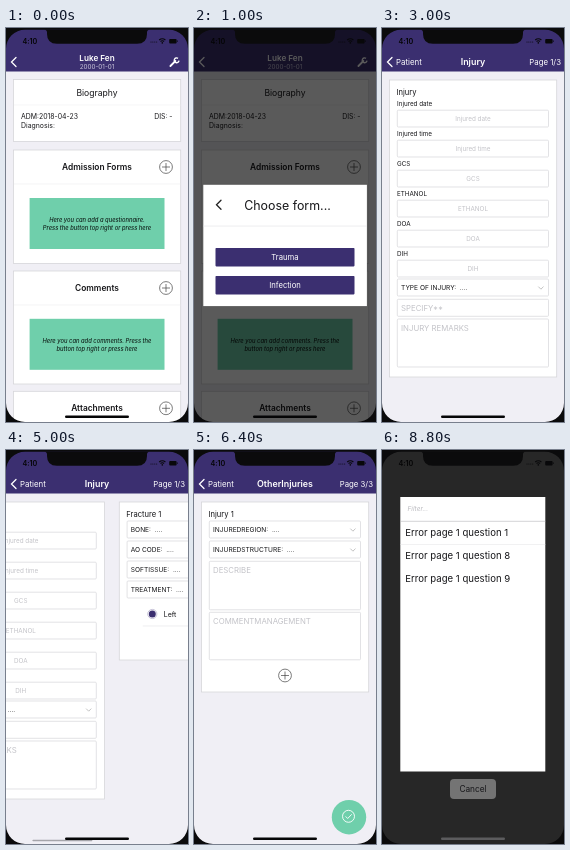
Animation, 182 px wide and 394 px high, one loop 8.9 s. Source, as an HTML page:

```html
<!DOCTYPE html>
<html lang="en">
<head>
<meta charset="utf-8">
<title>Patient forms</title>
<style>
  html, body { margin: 0; width: 100%; height: 100%; overflow: hidden; background: #0b0b0c; }
  svg { display: block; width: 100vw; height: 100vh; font-family: Inter, Roboto, sans-serif; }
</style>
</head>
<body>
<svg id="stage" viewBox="0 0 182 394"></svg>
<script>
const LOOP = 8900, W = 182, H = 394;
const PURPLE = '#3b2f70', GREEN = '#6fcfab', PAGE = '#f0eff5', EDGE = '#d6d6da', HINT = '#c3c3c8', INK = '#17171a';

// Drawing helpers
const rect = (x, y, w, h, fill, more = '') =>
  `<rect x="${x}" y="${y}" width="${w}" height="${h}" fill="${fill}" ${more}/>`;
const text = (s, x, y, size, fill = INK, more = '') =>
  `<text x="${x}" y="${y}" font-size="${size}" fill="${fill}" ${more}>${s}</text>`;
const stroke = (d, color, width, more = '') =>
  `<path d="${d}" fill="none" stroke="${color}" stroke-width="${width}" ${more}/>`;
const group = (id, body, more = '') => `<g id="${id}" ${more}>${body}</g>`;
const MID = ' text-anchor="middle"', END = ' text-anchor="end"', ITALIC = ' font-style="italic"';
const MEDIUM = ' font-weight="500"', BOLD = ' font-weight="600"';

const hline = (x1, x2, y, color = '#e2e2e6') => stroke(`M${x1} ${y}H${x2}`, color, .6);
const card = (y, h) => rect(7.5, y, 167.2, h, '#fff', `stroke="${EDGE}" stroke-width=".8"`);
const box = (y, h) => rect(15.3, y, 151.2, h, '#fff', `rx="1" stroke="${EDGE}" stroke-width=".7"`);
const plus = (x, y) => `<circle cx="${x}" cy="${y}" r="6.4" fill="none" stroke="#444" stroke-width=".7"/>` +
  stroke(`M${x - 4} ${y}h8M${x} ${y - 4}v8`, '#444', .7);
const back = (x, y, color) => stroke(`M${x + 4.5} ${y - 4.5}l-4.5 4.5 4.5 4.5`, color, 1.3, 'stroke-linecap="round"');
const field = (label, y) => text(label, 15, y, 6.3) + box(y + 4.2, 16.8) + text(label, 91, y + 15, 6.3, HINT, MID);
const picker = (label, y) => box(y, 17) + text(label + ':\u00a0 ....', 19, y + 10.8, 6.6) +
  stroke(`M156.3 ${y + 7.6}l2.6 2.6 2.6-2.6`, '#aaa', .7);
const area = (label, y, h) => box(y, h) + text(label, 19, y + 11.7, 7.8, HINT);
const radio = (x, y, on) => `<circle cx="${x}" cy="${y}" r="4.6" fill="#fff" stroke="#b9b4cf" stroke-width=".8"/>` +
  (on ? `<circle cx="${x}" cy="${y}" r="3.5" fill="${PURPLE}"/>` : '');

// Patient page
const section = (title, y, h) => card(y, h) + text(title, 91, y + 20, 8.4, INK, MID + BOLD) +
  plus(160, y + 17) + hline(8, 174.5, y + 34, '#ececef');
const hint = (y, a, b) => rect(23.6, y, 134.9, 51, GREEN) +
  text(a, 91, y + 24.3, 5.8, '#12241d', MID + ITALIC + MEDIUM) +
  text(b, 91, y + 31.7, 5.8, '#12241d', MID + ITALIC + MEDIUM);
const lowerCards = section('Comments', 243, 113) +
  hint(290.8, 'Here you can add comments. Press the', 'button top right or press here') +
  section('Attachments', 363.3, 113) +
  hint(410.8, 'Here you can add attachments.', 'Press the button top right or press here');

const patient = rect(0, 0, W, H, PAGE) + card(51.5, 62) +
  text('Biography', 91, 68, 8.6, INK, MID) + hline(8, 174.5, 77, '#f0f0f2') +
  text('ADM:2018-04-23', 15, 91.3, 6.9) + text('Diagnosis:', 15, 99.7, 6.9) + text('DIS: -', 166.5, 91.3, 6.9, INK, END) +
  group('noForm', section('Admission Forms', 122, 113.5) +
    hint(170, 'Here you can add a questionnaire.', 'Press the button top right or press here')) +
  group('oneForm', section('Admission Forms', 122, 82) +
    text('21/06/2018', 15, 176.3, 6.1, INK, ITALIC) + text('Trauma', 15, 188.7, 7.2) + hline(8, 174.5, 194.5)) +
  group('lower', lowerCards);

// Form pages, side by side
const labels = ['Injured date', 'Injured time', 'GCS', 'ETHANOL', 'DOA', 'DIH'];
const page1 = card(52, 297) + text('Injury', 14.5, 67, 7.6) +
  labels.map((s, i) => field(s, 78 + i * 30)).join('') +
  picker('TYPE OF INJURY', 251) + area('SPECIFY**', 271.3, 17) + area('INJURY REMARKS', 291, 48);
const page2 = card(52, 158) + text('Fracture 1', 14.5, 67, 7.6) +
  ['BONE', 'AO CODE', 'SOFTISSUE', 'TREATMENT'].map((s, i) => picker(s, 71 + i * 20)).join('') +
  radio(40.5, 164, true) + text('Left', 52, 166.8, 6.9) +
  radio(106, 164, false) + text('Right', 117, 166.8, 6.9) + hline(31, 152, 176) + plus(91, 193);
const page3 = card(52, 190) + text('Injury 1', 14.5, 67, 7.6) +
  picker('INJUREDREGION', 71) + picker('INJUREDSTRUCTURE', 91) +
  area('DESCRIBE', 111.3, 48.5) + area('COMMENTMANAGEMENT', 162.3, 47.5) + plus(91, 225.5);
const form = rect(-1.5, 0, 1.5, H, '#000', 'opacity=".12"') + rect(0, 0, W, H, PAGE) +
  `<svg width="${W}" height="${H}">` +
  group('pages', [page1, page2, page3].map((p, i) => `<g transform="translate(${i * W})">${p}</g>`).join('')) + '</svg>' +
  group('bar', rect(0, 389.8, 60, 1.5, '#a5a5aa', 'rx=".75"')) +
  group('fab', `<circle cx="155" cy="367.2" r="17.2" fill="${GREEN}"/>` +
    '<circle cx="154.5" cy="366.3" r="6" fill="none" stroke="#fff" stroke-width=".9"/>' +
    stroke('M151.6 366.4l2.1 2.1 4-4.2', '#fff', .9));

// Header
const wrench = stroke('M164.4 38l5-5', '#fff', 1.8, 'stroke-linecap="round"') +
  stroke('M172 30.3a2.4 2.4 0 1 0 1 2.4', '#fff', 1.4);
const header = rect(0, 0, W, 43.5, PURPLE) + back(5.5, 34, '#fff') +
  group('patientHead', text('Luke Fen', 91, 33.3, 8.2, '#fff', MID + BOLD) +
    text('2000-01-01', 91, 41, 6.3, '#c9c5da', MID) + wrench) +
  group('backLabel', text('Patient', 14, 37, 7.9, '#fff')) +
  group('formHead', text('', 91, 37, 8.9, '#fff', MID + BOLD + ' id="title"') +
    text('', 179, 37, 7.8, '#fff', END + ' id="count"'));

// Dialogs
const button = (id, label, y) => group(id, rect(21.5, y, 139, 18.4, PURPLE, 'rx=".8"') +
  text(label, 91, y + 12, 7.7, '#fff', MID));
const chooser = rect(9.3, 137, 163.6, 121.3, '#fff') + back(22.5, 157, '#222') +
  text('Choose form...', 93.5, 162, 12.4, INK, MID) + hline(9.3, 172.9, 178.3) +
  button('trauma', 'Trauma', 200.2) + button('infection', 'Infection', 228.2);
const errors = rect(0, 0, W, H, '#272727') + rect(18.3, 47, 145, 274.5, '#fff') +
  text('Filter...', 25.5, 61.2, 6.5, '#bcbcc1', ITALIC) + hline(18.3, 163.3, 71.3, '#b5b5b9') +
  [1, 8, 9].map((n, i) => text('Error page 1 question ' + n, 23.3, 86.3 + i * 22.8, 9.6)).join('') +
  hline(18.3, 163.3, 94.5, '#e8e8ea') +
  rect(68, 329, 46, 20, '#d4d4d4', 'rx="4" id="cancel"') + text('Cancel', 91, 342, 8.3, INK, MID);

// Device chrome
const status = text('4:10', 16.5, 16, 7.2, '#050506', BOLD) +
  [0, 1, 2, 3].map(i => `<circle cx="${145 + i * 1.9}" cy="14" r=".5" fill="#08080a"/>`).join('') +
  stroke('M153.2 12q3.1-2.6 6.2 0M154.5 13.5q1.8-1.4 3.6 0', '#08080a', 1.1) +
  '<circle cx="156.3" cy="14.9" r=".8" fill="#08080a"/>' +
  rect(163.2, 11, 7.4, 4.4, '#08080a', 'rx="1"') + rect(171, 12.4, .6, 1.6, '#08080a');
const bezel = `<path fill="#0b0b0c" fill-rule="evenodd" d="M0 0H${W}V${H}H0ZM19 1.8H163A19 19 0 0 1 182 20.8V375A19 19 0 0 1 163 394H19A19 19 0 0 1 0 375V20.8A19 19 0 0 1 19 1.8Z"/>` +
  '<path fill="#0b0b0c" d="M38 1.5Q41 1.8 41 4.5V6Q41 15.8 51 15.8H131Q141 15.8 141 6V4.5Q141 1.8 144 1.5Z"/>';

document.getElementById('stage').innerHTML =
  group('patient', patient) + rect(0, 0, W, H, '#000', 'id="shade"') + group('form', form) + header +
  rect(0, 0, W, H, '#000', 'id="backdrop"') + group('chooser', chooser) + group('errors', errors) +
  status + rect(59, 387.5, 64, 2.6, '#050506', 'rx="1.3" id="home"') + bezel;

const el = {};
document.querySelectorAll('[id]').forEach(n => el[n.id] = n);
const show = (id, o) => {
  el[id].setAttribute('opacity', o);
  el[id].setAttribute('display', o > 0 ? 'inline' : 'none');
};
const move = (id, x, y = 0) => el[id].setAttribute('transform', `translate(${x} ${y})`);
const ramp = (t, from, to) => Math.min(1, Math.max(0, (t - from) / (to - from)));
const inOut = p => (1 - Math.cos(Math.PI * p)) / 2;
const out = (p, n) => 1 - (1 - p) ** n;

const heads = [['Injury', 'Page 1/3'], ['Fractures', 'Page 2/3'], ['OtherInjuries', 'Page 3/3']];

function draw(t) {
  // Form chooser
  const choosing = t > 650 && t < 2200;
  const rise = inOut(ramp(t, 650, 1060));
  show('backdrop', choosing ? .68 * rise : 0);
  show('chooser', choosing ? 1 : 0);
  move('chooser', 0, H * (1 - rise));
  show('trauma', t >= 1800 ? .3 : 1);

  // Push from patient to form
  const added = t >= 2200;
  show('noForm', added ? 0 : 1);
  show('oneForm', added ? 1 : 0);
  move('lower', 0, added ? -32 : 0);
  const push = t < 2200 ? 0 : out(ramp(t, 2170, 2670), 4);
  move('patient', -.3 * W * push);
  show('shade', .14 * push);
  move('form', W * (1 - push));
  show('form', push > 0 ? 1 : 0);
  show('patientHead', 1 - Math.min(1, push * .8 + ramp(t, 2350, 2650)));
  show('backLabel', push * push);
  show('formHead', ramp(t, 2550, 2950));

  // Paging
  const scroll = W * (out(ramp(t, 4912, 5450), 3) + out(ramp(t, 5500, 6100), 3));
  move('pages', -scroll);
  move('bar', 1 + scroll / 3);
  show('bar', ramp(t, 4910, 4960) * (1 - ramp(t, 6200, 6400)));
  const head = heads[t < 5500 ? 0 : t < 6300 ? 1 : 2];
  el.title.textContent = head[0];
  el.count.textContent = head[1];
  show('fab', t >= 6300 ? 1 : 0);

  // Error list
  const fail = ramp(t, 7230, 7400);
  show('errors', fail);
  el.cancel.setAttribute('fill', t >= 8800 ? '#747474' : '#d4d4d4');
  el.home.setAttribute('fill', fail > 0 ? '#5c5c5e' : '#050506');
}

const start = performance.now();
function tick() {
  draw((performance.now() - start) % LOOP);
  requestAnimationFrame(tick);
}
tick();
</script>
</body>
</html>
```
